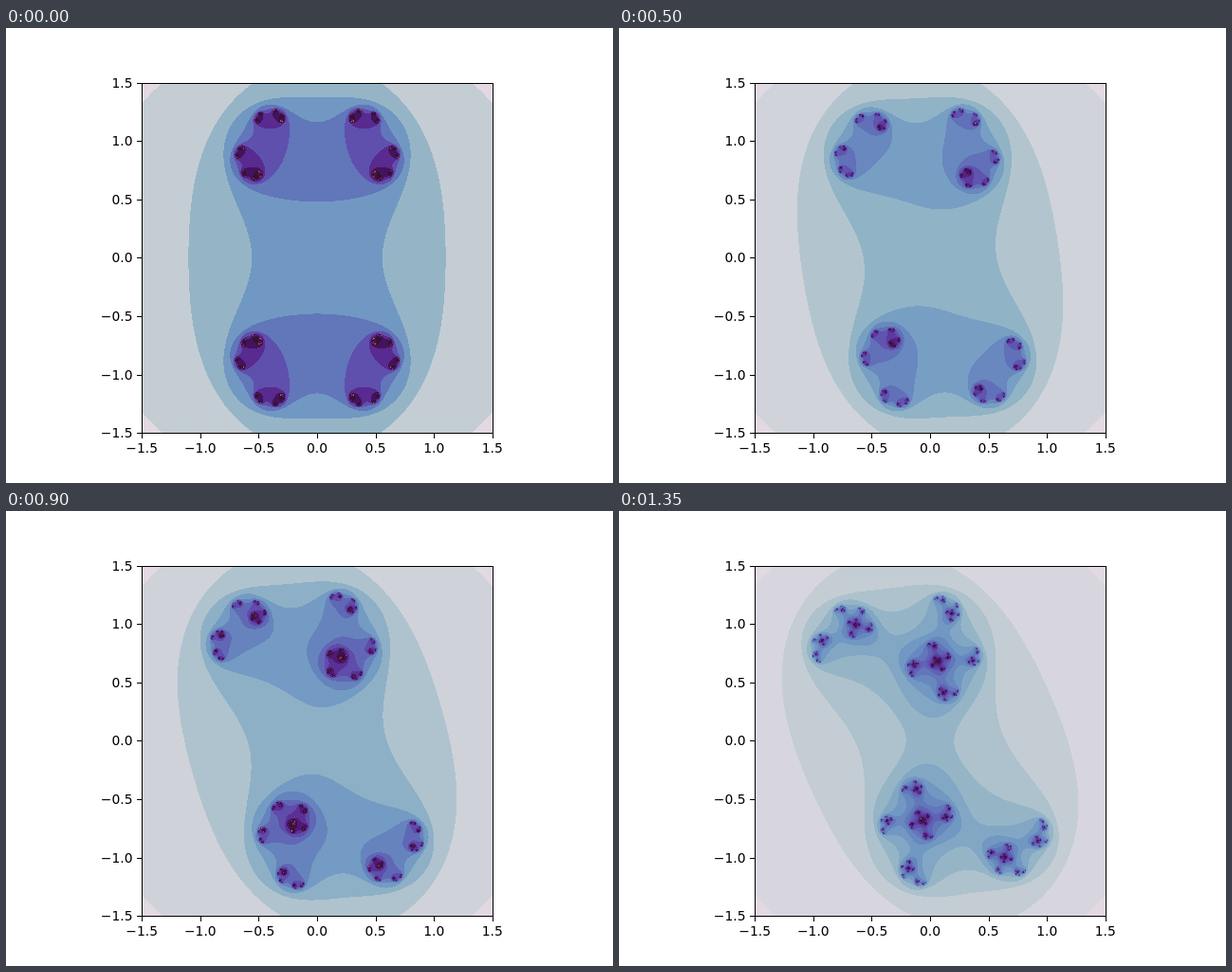
An HTML page with a canvas for the animation above (1400 ms loop, 640 px wide and 480 px high).

```html
<!DOCTYPE html>
<html lang="en">
<head>
<meta charset="utf-8">
<title>Julia set</title>
<style>
  html, body { margin: 0; width: 100%; height: 100%; overflow: hidden; background: #fff; }
  canvas { display: block; }
</style>
</head>
<body>
<canvas id="stage" width="640" height="480"></canvas>
<script>
const ctx = document.getElementById('stage').getContext('2d');
const STEPS = 28, STEP_MS = 50;
const UNIT = 123.2, CX = 328, CY = 242.4;            // pixels per unit, plot centre
const LEFT = 143, TOP = 58, RIGHT = 513, BOTTOM = 427; // spine pixels
const W = RIGHT - LEFT - 1, H = BOTTOM - TOP - 1;

// Cyclic colour map, evenly spaced stops
const STOPS = ('e2d9e2 c4cdd4 95b5c7 7198c2 6276ba 5f50ad 592a8f 45125c ' +
  '2f1436 481341 741e4f 963551 b25652 c17b69 cca389 d4c0b5')
  .split(' ').map(h => [0, 2, 4].map(i => parseInt(h.substr(i, 2), 16)));

// Highest iteration count of the colour scale: [step, count]
const DEPTH = [[0, 16], [5, 18], [10, 23], [13, 19], [16, 20], [21, 24], [27, 32]];

function depthAt(step) {
  const i = Math.max(1, DEPTH.findIndex(d => d[0] >= step));
  const [s0, d0] = DEPTH[i - 1], [s1, d1] = DEPTH[i];
  return Math.round(d0 + (d1 - d0) * (step - s0) / (s1 - s0));
}

function colour(t) {
  const n = STOPS.length, x = t * n, i = Math.floor(x), f = x - i;
  const [a, b, c, d] = [-1, 0, 1, 2].map(k => STOPS[(i + k + n) % n]);
  return [0, 1, 2].map(k => b[k] + f / 2 * (c[k] - a[k] +
    f * (2 * a[k] - 5 * b[k] + 4 * c[k] - d[k] + f * (3 * (b[k] - c[k]) + d[k] - a[k]))));
}

function escapeCount(x, y, cx, cy, limit) {
  let n = 0;
  while (n < limit && x * x + y * y <= 4) {
    [x, y] = [x * x - y * y + cx, 2 * x * y + cy];
    n++;
  }
  return n;
}

const image = ctx.createImageData(W, H);

function drawSet(step) {
  const angle = step * Math.PI / 100;
  const cx = 0.7885 * Math.cos(angle), cy = 0.7885 * Math.sin(angle);
  const depth = depthAt(step);
  const palette = Array.from({ length: depth + 1 }, (_, n) => colour(n / depth));
  let p = 0;
  for (let row = 0; row < H; row++) {
    const y = (CY - (TOP + 1.5 + row)) / UNIT;
    for (let col = 0; col < W; col++) {
      const x = (LEFT + 1.5 + col - CX) / UNIT;
      const rgb = palette[escapeCount(x, y, cx, cy, depth)];
      for (let k = 0; k < 3; k++) image.data[p++] = rgb[k];
      image.data[p++] = 255;
    }
  }
  ctx.putImageData(image, LEFT + 1, TOP + 1);
}

function drawAxes() {
  ctx.fillStyle = '#fff';
  ctx.fillRect(0, 0, 640, 480);
  ctx.fillStyle = '#000';
  ctx.fillRect(LEFT, TOP, W + 2, H + 2);
  ctx.font = '13.89px "DejaVu Sans", sans-serif';
  for (let v = -1.5; v <= 1.5; v += 0.5) {
    const label = v.toFixed(1).replace('-', '\u2212');
    const x = CX + v * UNIT, y = CY - v * UNIT;
    ctx.fillRect(Math.round(x), BOTTOM + 1, 1, 5);
    ctx.fillRect(LEFT - 5, Math.round(y), 5, 1);
    ctx.textAlign = 'center';
    ctx.fillText(label, x, 448);
    ctx.textAlign = 'right';
    ctx.fillText(label, 133.5, Math.round(y + 5));
  }
}

let shown = -1;
function tick() {
  const step = Math.floor(performance.now() / STEP_MS) % STEPS;
  if (step !== shown) drawSet(shown = step);
  requestAnimationFrame(tick);
}

drawAxes();
tick();
</script>
</body>
</html>
```
